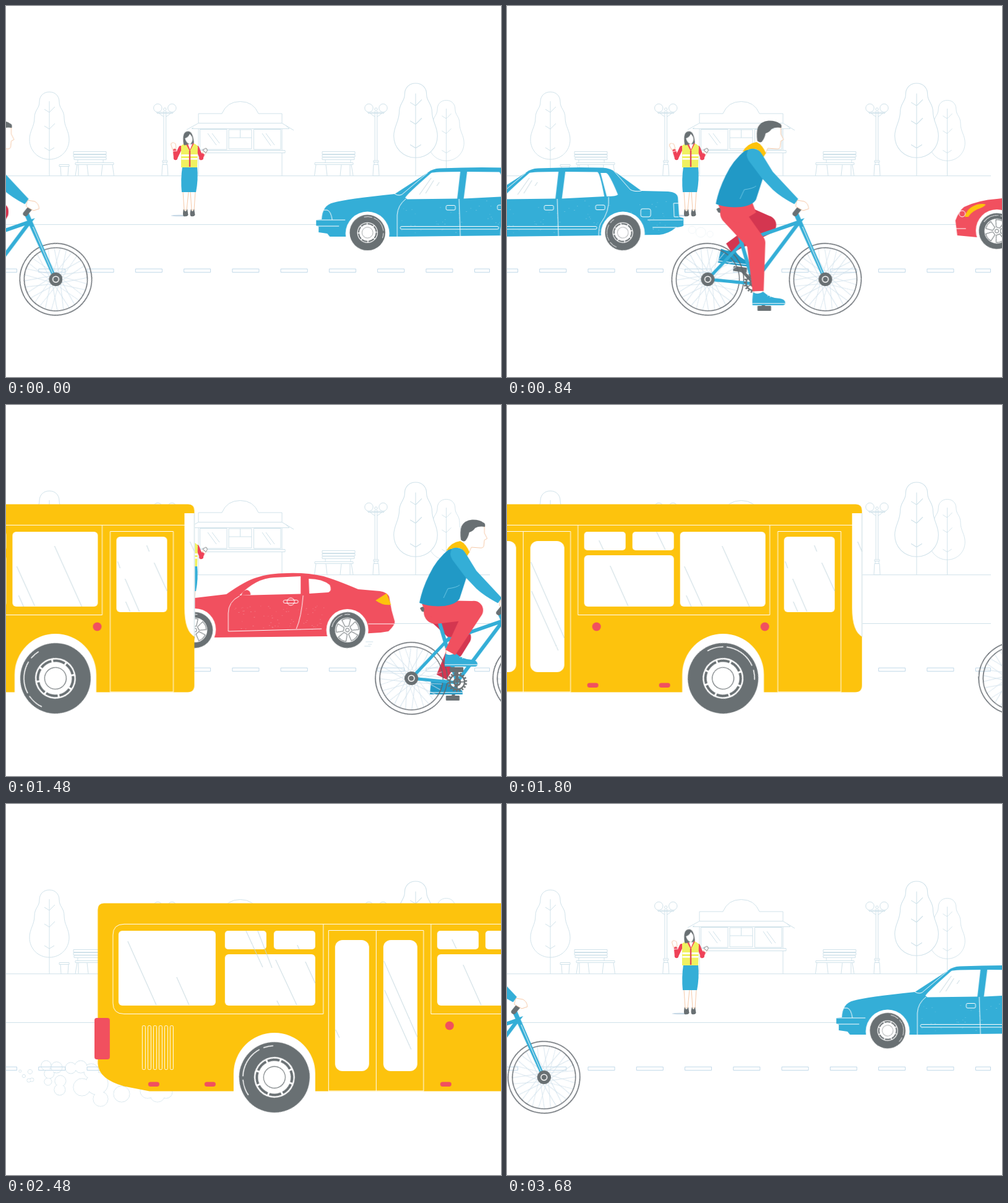
Animation, 800 px wide and 600 px high, one loop 3.72 s. Source, as an HTML page:

```html
<!DOCTYPE html>
<html lang="en">
<head>
<meta charset="utf-8">
<title>Street traffic</title>
<style>
html, body { margin: 0; width: 100%; height: 100%; overflow: hidden; background: #fff; }
svg { display: block; width: 800px; height: 600px; }
.go { animation: go 3720ms linear infinite; animation-delay: var(--d, 0s); }
.spin { animation: spin 3720ms linear infinite; animation-delay: var(--d, 0s); }
@keyframes go { from { transform: translateX(var(--a)); } to { transform: translateX(var(--b)); } }
@keyframes spin { to { transform: rotate(var(--r)); } }
#blueCar { --a: 465px; --b: -2418px; --d: -600ms; --r: -2232deg; }
#redCar { --a: 1124.8px; --b: -1702.4px; --r: -2232deg; }
#bus { --a: -2086.7px; --b: 1043.3px; --r: 1451deg; }
#bike { --a: -692.4px; --b: 1229.7px; --d: -500ms; --r: 1900deg; }

.wave { transform-origin: 274px 246px; animation: wave 3720ms ease-in-out infinite; }
.hold { transform-origin: 316px 246px; animation: hold 3720ms ease-in-out infinite; }
.nod { transform-origin: 297px 223px; animation: nod 3720ms ease-in-out infinite; }
@keyframes wave {
  0%, 100% { transform: rotate(157deg); }
  11% { transform: rotate(144deg); }
  22.6% { transform: rotate(146deg); }
  34% { transform: rotate(157deg); }
  40% { transform: rotate(150deg); }
  55%, 84.4% { transform: rotate(0deg); }
  92% { transform: rotate(157deg); }
}
@keyframes hold { 0%, 40%, 95%, 100% { transform: rotate(-18deg); } 55%, 84.4% { transform: rotate(0deg); } }
@keyframes nod { 0%, 40%, 97%, 100% { transform: rotate(-8deg); } 55%, 84.4% { transform: rotate(0deg); } }

.line { fill: none; stroke: #d0e2ea; stroke-width: 1; }
.solid { fill: #fff; }
.glare { fill: none; stroke: #c6d9e0; stroke-width: 1; }
.trim { fill: none; stroke: #fff; stroke-width: 1; }
.skin { fill: #fff; stroke: #f6c9a8; stroke-width: 1; }
.sleeve { fill: none; stroke: #ef4258; stroke-width: 6; stroke-linecap: round; }
.b { fill: #34aed7; } .db { fill: #2199c6; } .r { fill: #f1505f; } .dr { fill: #d43650; }
.y { fill: #fdc30d; } .k { fill: #697073; } .w { fill: #fff; }
.tube { fill: none; stroke: #34aed7; stroke-width: 6; }
.thin { stroke-width: 5; }
</style>
</head>
<body>
<svg viewBox="0 0 800 600">
<defs>
  <g id="tyre">
    <circle r="57" class="k"/>
    <circle r="51" fill="none" stroke="#fff" stroke-width="1.6" pathLength="360" stroke-dasharray="30 6 60 8 18 238" transform="rotate(-102)"/>
    <circle r="33" class="w"/>
    <circle r="28.5" fill="none" stroke="#697073" stroke-width="4" pathLength="360" stroke-dasharray="39 6"/>
    <circle r="17.5" fill="none" stroke="#697073" stroke-width="1.2"/>
  </g>
  <g id="alloy">
    <circle r="29" class="k"/>
    <circle r="25.5" fill="none" stroke="#fff" pathLength="360" stroke-dasharray="60 8 20 272"/>
    <circle r="20" class="w"/>
    <g id="spokes5" fill="#fff" stroke="#697073" stroke-width="1"></g>
    <circle r="3" fill="#fff" stroke="#697073"/>
  </g>
  <g id="wheel">
    <path id="spokes" fill="none" stroke="#d0e0eb" stroke-width=".9"/>
    <g fill="none" stroke="#5f656b"><circle r="58" stroke-width="1.5"/><circle r="51" stroke-width="1.3"/></g>
  </g>
  <g id="hub"><circle r="11" class="k"/><circle r="4.8" fill="none" stroke="#fff" stroke-width="1.6"/></g>
  <g id="tree" class="line">
    <path class="solid" d="M0 0C-10 0-16 7-16 16C-16 27-24 29-24 42C-24 56-32 63-32 77C-32 95-18 109 0 109S32 95 32 77C32 63 24 56 24 42C24 29 16 27 16 16C16 7 10 0 0 0Z"/>
    <path d="M0 15V109M-8 28L0 33L9 24M-8 55L0 60L9 51M-8 90L0 95L8 90"/>
  </g>
  <g id="bench" class="line">
    <path d="M109 235.500h53v4h-53zM109 240.500h53v3.500h-53zM110 245h52v3.500h-52zM116 248.500v5M157 248.500v5"/>
    <path class="solid" d="M112 253.500h62v3h-62zM115 256.500L112 274.500M131 256.500L133 274.500M156 256.500L154 274.500M172 256.500L174.500 274.500M117 256.500V274"/>
  </g>
  <g id="lamp" class="line">
    <circle cx="-11.500" cy="165" r="6.700"/><circle cx="11.500" cy="165" r="6.700"/><circle cy="167" r="2.200"/>
    <path d="M-14 172H14M-13 173.500H13M-9 174L-2 179M9 174L2 179M-1.800 170V250M1.800 170V250M-4 250h8v2.500h-8zM-3 252.500v4M3 252.500v4M-4 256.500h8L5 274.500H-5Z"/>
  </g>
  <path id="bluePath" d="M502 346L511 345Q512 322 530 318Q550 312 629 304L683 269Q690 263 702 262.500Q760 260 806 261.500Q820 262 829 270L869 299L912 300Q927 301 928 310L930 341L937 343V355Q936 357 925 358Q914 368 898 370L640 373L524 373L520 368L506 366V357L502 355Z"/>
  <path id="redPath" d="M239 347Q245 331 253 325Q276 314 306 312L357 306Q388 284 406 279Q426 272 455 272Q488 271 514 277Q532 282 570 298L605 301Q617 303 620 310L624 332L629 350Q630 355 619 366Q605 369 590 369L522 374L336 376L274 374L242 371Z"/>
</defs>

<g class="line" id="scenery">
  <path d="M0 274.700H782M0 353.500H782"/>
  <path id="dashes" stroke="#c0d8e8"/>
  <use href="#tree" transform="translate(711.500 152.500) scale(.897)"/><path d="M711.500 250V274.700"/>
  <use href="#tree" transform="translate(662 125) scale(1.103)"/><path d="M662 245V274.700"/>
  <use href="#tree" x="70" y="139"/><path d="M70 248V274.700"/>
  <path d="M86 256.500h16v3h-16zM88 259.500L89 274.500M101 259.500L100 274.500"/>
  <use href="#bench"/><use href="#bench" transform="matrix(-1 0 0 1 673 0)"/>
  <use href="#lamp" x="256.800"/><use href="#lamp" x="598"/>
  <path class="solid" d="M311 189.500V174H349Q357 154.500 378.500 154.500T408 174H446V189.500Z"/>
  <path d="M465 201L446 189.500H311L292 200M303 196.500L300 198.500H458L452 193M311 198.500V274.500M446 198.500V274.500M313.500 199.500H357V232H313.500ZM360 200H397V231H360ZM360 213H397M378.500 200V213M400.500 199.500H444V232H400.500Z"/>
  <path class="solid" d="M306 233.500H451V237.500H306Z"/>
  <path d="M326 206L340 225M333 206L345 222M414 206L428 226M420 206L434 225"/>
</g>

<g id="woman">
  <path d="M266 339Q272 337 290 338L294 340Q270 341 266 339Z" fill="#c6d8e6"/>
  <path class="skin" d="M286 300L288 330H292L295 300ZM298 300L300 330H304L306 300Z"/>
  <path class="k" d="M287 328Q290 336 293 328L294.500 338Q293 341 287 340Q285 338 287 328ZM299 328Q301 336 304 328L305.500 338Q304 341 299 340Q296 338 299 328Z"/>
  <path class="b" d="M285 260H309Q311 281 307 301H284Q282 280 285 260Z"/>
  <path class="sleeve" d="M282 229L274 246"/>
  <g class="wave">
    <path class="skin" d="M267 260L265 267Q267 273 272 270L273 261Z"/>
    <path class="sleeve" d="M274 246L270.500 257.500"/>
    <path class="trim" d="M267 256L274 258"/>
  </g>
  <path class="sleeve" d="M309 229L316 246"/>
  <g class="hold">
    <path class="skin" d="M319 239L325 235L329 237L322 243Z"/>
    <path d="M322 234L328 233L329 237L325 240Z" fill="#fff" stroke="#697073" stroke-width=".8"/>
    <path class="sleeve" d="M315 246L319 242"/>
  </g>
  <path d="M283 226Q288 222 292 222H302Q307 223 310 227L309 261H283Z" fill="#f0f160"/>
  <path class="w" d="M283.500 240H309.500V243H283.500ZM283.500 246H309.500V248.500H283.500Z"/>
  <path class="r" d="M290 222L297 235L304 222L301 221H293Z"/>
  <path class="w" d="M293 221L297.500 232L302 221Z"/>
  <path d="M297 234V260" stroke="#e14b55" stroke-width="2.400"/>
  <g class="nod">
    <path class="k" d="M287 222Q287 202 296 202.500Q305 202 304 222Q301 225 297 223L288 224Z"/>
    <path class="w" d="M290.500 213Q297 212 299 207Q303 211 302.500 217Q300 223 297 223Q292 222 290.500 213Z"/>
  </g>
</g>

<g id="blueCar" class="go">
  <g class="line" opacity=".3"><circle cx="951" cy="362" r="6"/><circle cx="965" cy="366" r="8"/><circle cx="980" cy="369" r="5"/></g>
  <use href="#bluePath" class="b"/>
  <path class="specks trim" data-box="640 315 280 52"/>
  <path class="w" d="M646 310Q649 304 688 270Q692 268 735 268L730 311.500L649 312.500ZM746 268L798 268.500Q802 270 809 308L740.500 311.500ZM803 270L812 270Q817 271 831 305Q829 308 813 308Z"/>
  <path class="trim" d="M629 304Q638 309 644 302L682 270M633 373V338Q634 322 647 312M733 312L735 372M502 346H549M513 330H520Q526 332 528 346M503 356H539M816 309Q818 332 803 352Q800 358 800 371M823 265L851 297Q858 301 869 299M879 346H936M887 358H926M921 319H929M921 319L922 341H929"/>
  <g class="trim">
    <rect x="638" y="356.500" width="159" height="4.500" rx="2"/>
    <rect x="712" y="322.500" width="15" height="7.500" rx="2"/><rect x="795" y="322" width="15" height="7.500" rx="2"/>
    <rect x="868" y="328" width="16" height="13" rx="3"/>
  </g>
  <path class="glare" d="M669 305L688 278M679 303L692 282M701 285L697 291"/>
  <circle class="w" cx="585" cy="368" r="35.500"/><circle class="w" cx="839" cy="368" r="35.500"/>
  <g transform="translate(585 366.500) scale(.505)"><use href="#tyre" class="spin"/></g>
  <g transform="translate(839 366.500) scale(.505)"><use href="#tyre" class="spin"/></g>
</g>

<g id="redCar" class="go">
  <path class="line" d="M582 383H594M586 387H592M580 390H590"/>
  <use href="#redPath" class="r"/>
  <path class="specks trim" data-box="365 325 150 40"/>
  <path class="w" d="M378 308Q405 280 434 279L477 277V305.500ZM490 281Q512 281 524 291Q528 300 522 303L491 305Z"/>
  <path class="r" d="M381 308Q383 300 390 299Q396 300 396 307Z"/>
  <path class="y" d="M254 341Q258 326 274 321Q284 319 288 321Q286 325 274 329Q264 334 260 341ZM598 316L616 304.500L623 323Q610 325 598 316Z"/>
  <g class="trim"><circle cx="250" cy="336" r="5"/>
    <path d="M360 366V337Q360 318 378 309M360 366L511 362M470 362Q478 344 481 308M240 360H256M586 354H628"/>
    <rect x="449" y="315.500" width="24" height="5" rx="2.500"/><circle cx="461" cy="318" r="6"/></g>
  <circle class="w" cx="306" cy="363" r="34"/><circle class="w" cx="552.500" cy="364" r="34"/>
  <g transform="translate(306 364)"><use href="#alloy" class="spin"/></g>
  <g transform="translate(552.500 364)"><use href="#alloy" class="spin"/></g>
</g>

<g id="bus" class="go">
  <g id="smoke" class="line"></g>
  <path class="y" d="M157.500 160.500H1135Q1145 160.500 1145 171V453Q1145 464.500 1134 464.500H231L190 456.500Q149 445 147.500 420V171Q147.500 160.500 157.500 160.500Z"/>
  <path class="w" d="M1129 175H1146V375Q1129 367 1129 328Z"/>
  <path class="glare" d="M1145 175V375M1138 221L1145 237"/>
  <path class="trim" d="M1129 194.300H190Q172 194.300 172 212V322Q172 339.500 190 339.500H512V194.300M686 194.300V339.500H996V194.300M520.500 464.500V204.500H674V464.500M597.500 204.500V464.500M520 464H674M1009 464.500V204.500H1111V464.500M1009 464H1111"/>
  <g id="panes" class="w"></g>
  <g id="vents" class="trim"></g>
  <path class="glare" d="M196 222L242 325M275 280L295 325M387 205L414 264M406 205L429 265M435 252L469 325M437 318L441 326M470 228L473 235M483 255L499 290M532 365L538 378M610 254L664 377M611 301L654 397M720 219L727 234M738 260L767 325M813 205L827 234M919 228L963 326M858 261L887 325M861 308L869 326M1021 253L1025 264M1033 281L1056 334M1034 318L1041 334M1068 227L1072 237M1080 255L1101 301"/>
  <g class="r">
    <rect x="142" y="346" width="25" height="67" rx="4"/>
    <circle cx="716" cy="358.500" r="7"/><circle cx="988" cy="358.500" r="7"/>
    <rect x="229" y="449.500" width="18" height="7.500" rx="3.700"/><rect x="320" y="449.500" width="18" height="7.500" rx="3.700"/>
    <rect x="701" y="449.500" width="18" height="7.500" rx="3.700"/><rect x="817" y="449.500" width="18" height="7.500" rx="3.700"/>
  </g>
  <path class="w" d="M367 466V436a66 66 0 0 1 132 0V466ZM854.500 466V436a66 66 0 0 1 132 0V466Z"/>
  <g transform="translate(433 442)"><use href="#tyre" class="spin"/></g>
  <g transform="translate(920.500 442)"><use href="#tyre" class="spin"/></g>
</g>

<g id="bike" class="go">
  <path id="farCrank" stroke="#697073" stroke-width="5"/>
  <g id="farFoot"><rect class="k" x="-11" y="-3" width="22" height="8" rx="1"/>
    <path class="db" d="M-35-28Q-20-24-13-29Q-4-17 11-14Q17-11 16-5H-37Z"/><path class="trim" d="M-37-8H16"/></g>
  <path id="farLeg" class="dr"/>
  <g transform="translate(324 442)"><use href="#wheel" class="spin"/></g>
  <g transform="translate(514 442)"><use href="#wheel" class="spin"/></g>
  <path class="tube" d="M366 340L398 449M380 381L472 349L397 449"/>
  <path class="tube thin" d="M386 376L324 442L397 449"/>
  <path class="b" d="M463 337L470 334L516 441L511 443Z"/>
  <path class="trim" d="M477 357L509 432"/>
  <path d="M465 336L474 325" fill="none" stroke="#697073" stroke-width="8" stroke-linecap="round"/>
  <path class="k" d="M338 329Q340 323 378 326V332Q350 337 341 334Z"/>
  <use href="#hub" x="324" y="442"/><use href="#hub" x="514" y="442"/>
  <g id="ring" fill="none" stroke="#697073"><circle r="12" stroke-width="2.500"/><circle r="14.500" stroke-width="3" pathLength="36" stroke-dasharray="1 1"/><circle r="5" stroke-width="3"/><path d="M-12 0H12M0-12V12" stroke-width="1.500"/></g>
  <path id="nearCrank" stroke="#697073" stroke-width="5"/>
  <g id="nearFoot"><rect class="k" x="-11" y="-3" width="22" height="8" rx="1"/>
    <path class="skin" d="M-17-34H-2V-22H-17Z"/>
    <path class="b" d="M-18-25Q-10-20-2-26Q10-15 25-15Q34-14 34-7Q33-4 30-4H-19Q-20-12-18-25Z"/><path class="trim" d="M-19-7H34M5-19L9-22M9-17L13-20"/></g>
  <path id="nearLeg" class="r"/>
  <path class="r" d="M341 322L395 315L402 334L372 352L350 340Z"/>
  <path class="db" d="M386 232Q364 250 353 274Q341 298 337 320Q352 327 378 325Q397 322 402 313L413 279L414 262L405 235Z"/>
  <path d="M376 312L383 297Q398 295 402 291" fill="none" stroke="#6cc6e4"/>
  <path class="skin" d="M417 205L442 197V207L446.500 216L442 218.500L441 228Q440 232 434 231L421 230L417 239L408 226Z" stroke-linejoin="round"/>
  <path class="w" d="M410 203L441 197L438 207L438 226L419 229L417 237L409 225Z"/>
  <path class="k" d="M404 218Q402 205 405 196Q410 186.500 422 185.500Q434 185 440 190Q444 191 443 197Q433 195.500 427 199Q424 204 417.500 206Q416 214 411 220Q407 221.500 404 218Z"/>
  <path class="y" d="M380 236Q388 222 403 220Q412 224 418 238L413 246Q410 234 401 231Q390 231 380 236Z"/>
  <path class="skin" d="M468 314L480 316Q487 320 487 328L478 331L466 324Z"/>
  <path class="b" d="M390 232Q405 227 413 242L429 268L470 312L464 320.500Q442 309 429 297L411 278L390 250Q384 240 390 232Z"/>
</g>
</svg>
<script>
const $ = id => document.getElementById(id);
const times = (n, f) => Array.from({ length: n }, (_, i) => f(i)).join('');
const polar = (r, deg) => [r * Math.cos(deg * Math.PI / 180), r * Math.sin(deg * Math.PI / 180)];

$('spokes').setAttribute('d', times(32, i => `M${polar(10, i * 11.25 + (i % 2 ? 35 : -35))}L${polar(51, i * 11.25)}`));
$('spokes5').innerHTML = times(5, i => `<path transform="rotate(${i * 72})" d="M6-3L17-7A18 18 0 0 1 17 7L6 3Z"/>`);
$('dashes').setAttribute('d', times(10, i => `M${-25.5 + i * 78.27} 425.200h43v5.500h-43z`) + 'M757.500 425.200h24v5.500h-24z');
$('vents').innerHTML = times(6, i => `<rect x="${219.5 + i * 9}" y="358.500" width="5" height="71" rx="2"/>`);

// x, y, width, height, corner radius
$('panes').innerHTML = [
  [181, 205, 157, 121, 6], [353, 205, 67, 30, 5], [432, 205, 67, 30, 5], [353, 243, 146, 83, 6],
  [531, 220, 55, 212, 12], [609, 220, 55, 212, 12], [696, 205, 67, 30, 5], [774, 205, 67, 30, 5],
  [696, 243, 145, 83, 6], [851, 205, 138, 121, 6], [1019, 213, 82, 122, 6]
].map(([x, y, w, h, r]) => `<rect x="${x}" y="${y}" width="${w}" height="${h}" rx="${r}"/>`).join('');

// Each cloud shows only the outer edge of its circles
const clouds = [
  [[22, 432, 2]], [[28, 440, 2.5]], [[38, 433, 3.5]], [[36, 447, 3], [41, 446, 3]],
  [[64, 423, 8], [81, 426, 9], [69, 436, 8], [67, 449, 6], [87, 448, 9], [86, 462, 9]],
  [[104, 427, 9], [120, 425, 10], [137, 432, 12], [122, 458, 14], [146, 452, 18], [152, 477, 12], [186, 469, 13]],
  [[228, 464, 12], [244, 470, 12], [258, 466, 10]]
];
const dot = (c, grow) => `<circle cx="${c[0]}" cy="${c[1]}" r="${c[2] + grow}"/>`;
$('smoke').innerHTML = clouds.map((c, i) =>
  `<mask id="m${i}" maskUnits="userSpaceOnUse" x="0" y="400" width="300" height="100" stroke="none"><rect y="400" width="300" height="100" fill="#fff"/>${c.map(p => dot(p, -.5)).join('')}</mask>
  <g mask="url(#m${i})">${c.map(p => dot(p, 0)).join('')}</g>`).join('');
document.querySelectorAll('mask circle').forEach(e => e.setAttribute('fill', '#000'));

let seed = 7;
const rnd = () => (seed = seed * 16807 % 2147483647) / 2147483647;
document.querySelectorAll('.specks').forEach(e => {
  const [x, y, w, h] = e.dataset.box.split(' ').map(Number);
  e.setAttribute('d', times(70, () => `M${x + w * rnd()} ${y + h * rnd()}h${.5 + rnd()}`));
  e.style.opacity = .35;
});

function limb([ax, ay], ra, [bx, by], rb) {
  const d = Math.hypot(bx - ax, by - ay), nx = (ay - by) / d, ny = (bx - ax) / d;
  return `M${ax + nx * ra} ${ay + ny * ra}L${ax - nx * ra} ${ay - ny * ra}L${bx - nx * rb} ${by - ny * rb}L${bx + nx * rb} ${by + ny * rb}Z`
    + `M${ax - ra} ${ay}a${ra} ${ra} 0 0 1 ${2 * ra} 0a${ra} ${ra} 0 0 1 ${-2 * ra} 0Z`;
}
function knee([hx, hy], [ax, ay], thigh, shin) {
  const dx = ax - hx, dy = ay - hy, d = Math.hypot(dx, dy);
  const a = (thigh * thigh - shin * shin + d * d) / (2 * d);
  const h = Math.sqrt(Math.max(0, thigh * thigh - a * a));
  return [hx + (dx * a + dy * h) / d, hy + (dy * a - dx * h) / d];
}
const hub = [398, 448];
function leg(side, o, deg) {
  const [cx, cy] = polar(o.r, deg), px = o.at[0] + cx, py = o.at[1] + cy;
  const ankle = [px + o.ankle[0], py + o.ankle[1]], k = knee(o.hip, ankle, o.thigh, o.shin);
  const tilt = o.tilt * Math.max(0, -Math.sin(deg * Math.PI / 180));
  $(side + 'Crank').setAttribute('d', `M${hub}L${px} ${py}`);
  $(side + 'Foot').setAttribute('transform', `translate(${px} ${py}) rotate(${tilt})`);
  $(side + 'Leg').setAttribute('d', limb(o.hip, 19, k, 15) + limb(k, 15, ankle, 9));
}
const near = { at: [398, 460], r: 33, hip: [363, 335], ankle: [-10, -27], thigh: 62, shin: 78, tilt: 0 };
const far = { at: [390, 447], r: 26, hip: [367, 335], ankle: [-18, -33], thigh: 56, shin: 72, tilt: 9 };

function draw() {
  let t = performance.now() % 3720;
  if (t > 3220) t -= 3720;
  const deg = 58 + .328 * (t - 840);
  leg('near', near, deg);
  leg('far', far, deg + 180);
  $('ring').setAttribute('transform', `translate(${hub}) rotate(${deg})`);
  requestAnimationFrame(draw);
}
draw();
</script>
</body>
</html>
```
